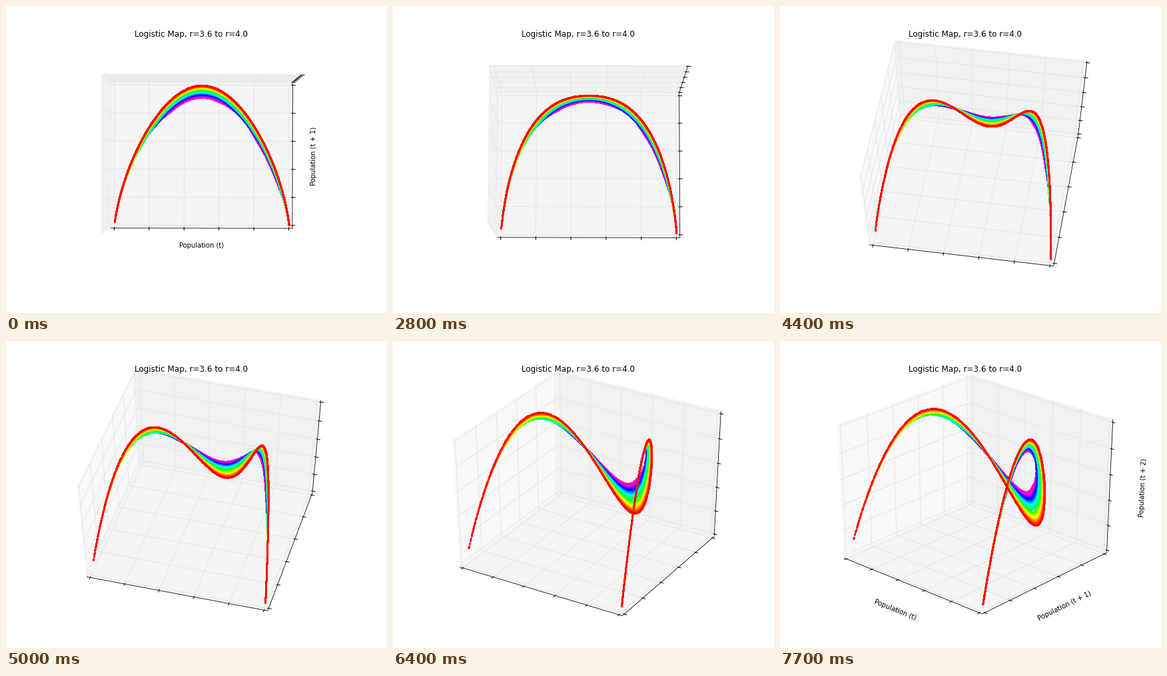
Recreate the animation shown at these times as a matplotlib script. Size 572 by 460 pixels, loop 10 s.

```python
import numpy as np
import matplotlib
import matplotlib.pyplot as plt
from matplotlib.animation import FuncAnimation
from matplotlib.collections import LineCollection
from matplotlib.patches import Polygon

W, H = 572, 460
FRAMES, INTERVAL = 100, 100
CX, CY = 293.7, 223.4        # screen position of the cube's centre
SX, SY = 274.4, 219.9        # pixels per unit at the centre
DIST = 11.0
LO, HI = -1 / 48, 1 + 1 / 48
TICKS = np.linspace(0, 1, 6)
TICK_IN, TICK_OUT = 0.1 / 12, 0.2 / 12

# first frame, last frame, change of elevation, change of azimuth per frame
CAMERA = [
    (20, 22, -0.5, 0),
    (23, 36, -1.0, 0),
    (37, 60, -1.5, 1.1),
    (61, 64, -1.0, 1.1),
    (65, 73, -0.5, 1.1),
    (74, 76, -0.2, 0.5),
]
LABELS_OFF, LABELS_ON = 20, 77


def view(n):
    elev, azim = 89.9, 270.1
    for first, last, de, da in CAMERA:
        steps = min(max(n - first + 1, 0), last - first + 1)
        elev += de * steps
        azim += da * steps
    return np.radians(elev), np.radians(azim)


def project(points, elev, azim):
    """Perspective projection of (..., 3) data points to stage pixels."""
    ce, se, ca, sa = np.cos(elev), np.sin(elev), np.cos(azim), np.sin(azim)
    v = np.asarray(points) - 0.5
    right = v @ np.array([-sa, ca, 0])
    up = v @ np.array([-ca * se, -sa * se, ce])
    near = v @ np.array([ca * ce, sa * ce, se])
    k = DIST / (DIST - near)
    return np.stack([CX + SX * k * right, CY - SY * k * up], axis=-1)


def logistic_orbits(rates, gens):
    pops = np.empty((gens + 2, len(rates)))
    pops[0] = 0.5
    for i in range(gens + 1):
        pops[i + 1] = pops[i] * rates * (1 - pops[i])
    return np.stack([pops[:-2], pops[1:-1], pops[2:]], axis=-1)


rates = np.linspace(3.6, 3.992, 50)
orbits = logistic_orbits(rates, 1000)
colors = matplotlib.colormaps["hsv"](np.linspace(0.94, 0, len(rates)))

# back walls and floor
PANES = [
    ([(LO, LO, LO), (LO, HI, LO), (LO, HI, HI), (LO, LO, HI)], "0.975"),
    ([(LO, HI, LO), (HI, HI, LO), (HI, HI, HI), (LO, HI, HI)], "0.95"),
    ([(LO, LO, LO), (HI, LO, LO), (HI, HI, LO), (LO, HI, LO)], "0.9625"),
]
GRID = np.array(
    [[(t, LO, LO), (t, HI, LO), (t, HI, HI)] for t in TICKS]
    + [[(HI, t, LO), (LO, t, LO), (LO, t, HI)] for t in TICKS]
    + [[(LO, LO, t), (LO, HI, t), (HI, HI, t)] for t in TICKS]
)
AXES = np.array([
    [(LO, LO, LO), (HI, LO, LO)],
    [(HI, LO, LO), (HI, HI, LO)],
    [(HI, HI, LO), (HI, HI, HI)],
])
TICK_LINES = np.array(
    [[(t, LO + TICK_IN, LO), (t, LO - TICK_OUT, LO)] for t in TICKS]
    + [[(HI - TICK_IN, t, LO), (HI + TICK_OUT, t, LO)] for t in TICKS]
    + [[(HI - TICK_IN, HI, t), (HI + TICK_OUT, HI, t)] for t in TICKS]
)

plt.rcParams["font.family"] = "DejaVu Sans"
fig = plt.figure(figsize=(W / 72, H / 72), dpi=72, facecolor="white")
ax = fig.add_axes([0, 0, 1, 1])
ax.set_xlim(0, W)
ax.set_ylim(H, 0)
ax.axis("off")

panes = [
    ax.add_patch(Polygon([(0, 0), (1, 0), (1, 1)], fc=c, ec=c, lw=1, zorder=0))
    for _, c in PANES
]
grid = ax.add_collection(LineCollection([], colors="0.9", lw=1, zorder=1))
axis_lines = ax.add_collection(LineCollection([], colors="k", lw=0.8, zorder=2))
ticks = ax.add_collection(LineCollection([], colors="k", lw=1, zorder=2))
dots = [
    ax.plot([], [], "o", ms=2.5, mew=0, color=c, zorder=3)[0] for c in colors
]
ax.text(278, 46, "Logistic Map, r=3.6 to r=4.0", size=12,
        ha="center", va="baseline", zorder=5)
labels = [
    ax.text(0, 0, f"Population ({t})", size=10, ha="center", va="center", zorder=5)
    for t in ("t", "t + 1", "t + 2")
]
LABELS_TOP = [(293.5, 359.5), (462, 225)]
LABELS_SIDE = [(172.5, 403), (427, 397), (545, 220)]


def place_labels(n, edges):
    if n < LABELS_OFF:
        spots = LABELS_TOP
    elif n >= LABELS_ON:
        spots = LABELS_SIDE
    else:
        spots = []
    for i, label in enumerate(labels):
        label.set_visible(i < len(spots))
        if i < len(spots):
            dx, dy = edges[i, 1] - edges[i, 0]
            label.set_position(spots[i])
            label.set_rotation(np.degrees(np.arctan2(-dy, dx)))


def update(n):
    cam = view(n)
    for patch, (corners, _) in zip(panes, PANES):
        patch.set_xy(project(corners, *cam))
    edges = project(AXES, *cam)
    grid.set_segments(project(GRID, *cam))
    axis_lines.set_segments(edges)
    ticks.set_segments(project(TICK_LINES, *cam))
    xy = project(orbits, *cam)
    for i, line in enumerate(dots):
        line.set_data(xy[:, i, 0], xy[:, i, 1])
    place_labels(n, edges)
    return []


anim = FuncAnimation(fig, update, frames=FRAMES, interval=INTERVAL,
                     repeat=True, repeat_delay=0, blit=False)
plt.show()
```
